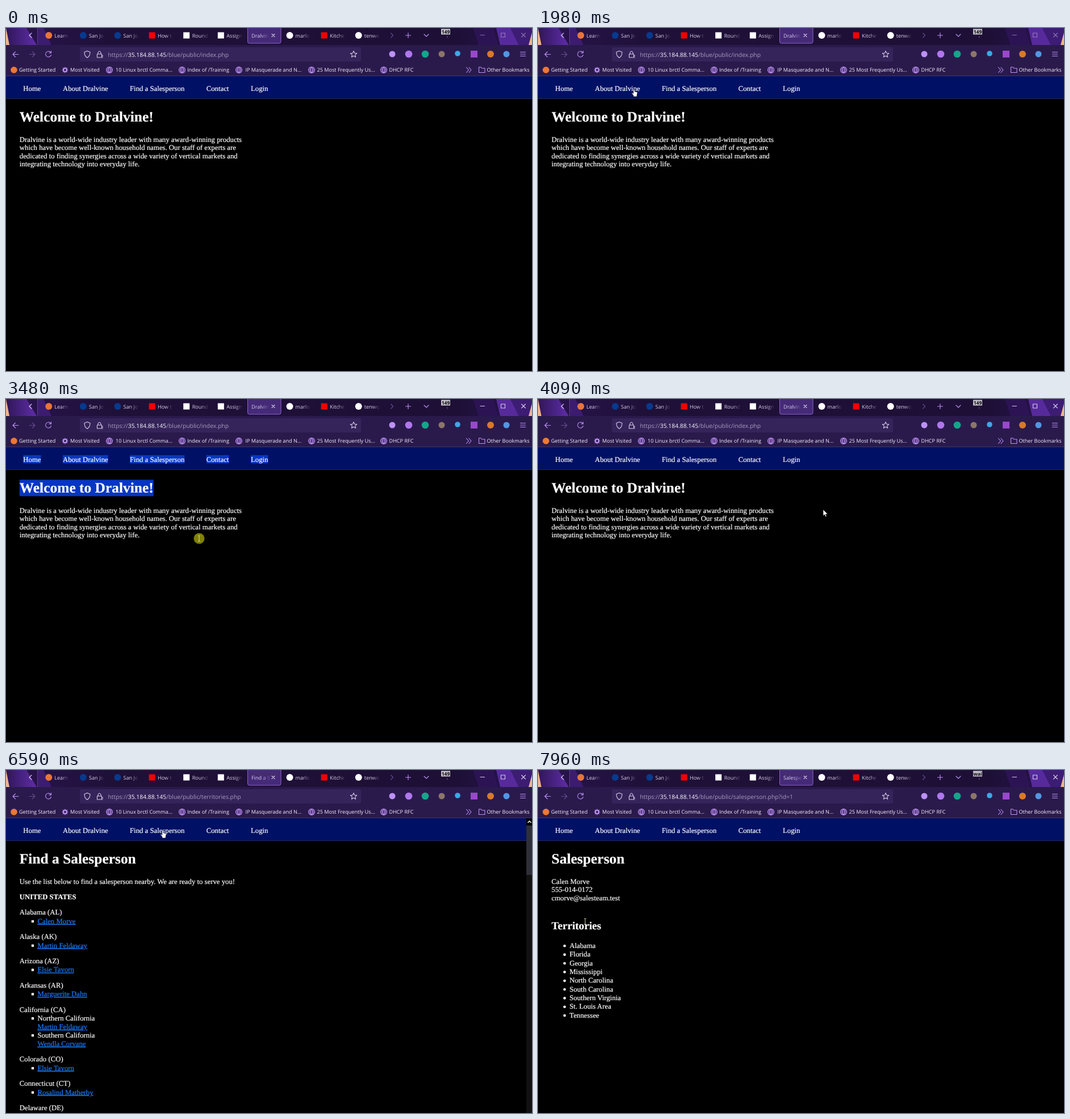
These frames come from a looping animation (926x605 px, 8000 ms). An HTML page:

```html
<!DOCTYPE html>
<html lang="en">
<head>
<meta charset="utf-8">
<title>Browser session</title>
<style>
  html, body { margin: 0; width: 100%; height: 100%; overflow: hidden; background: #000; }
  svg { display: block; width: 926px; height: 605px; }
  text { white-space: pre; text-rendering: geometricPrecision; }
  .ui { font: 9.1px "Open Sans", "Noto Sans", sans-serif; fill: #f4f0fb; }
  .url { font-size: 10.35px; fill: #a69bbd; }
  .url tspan { fill: #fbf9ff; }
  .page { font: 12.75px "Liberation Serif", "Times New Roman", serif; fill: #fff; }
  .page text { stroke: #fff; stroke-width: .2; }
  .page .h1 { font-size: 25.45px; font-weight: bold; }
  .page .h2 { font-size: 19.1px; font-weight: bold; }
  .bold { font-weight: bold; }
  .page .link { fill: #1a7cff; stroke: #1a7cff; text-decoration: underline; }
  .line { fill: none; stroke: #bd91f5; stroke-width: 1.1; stroke-linecap: round; stroke-linejoin: round; }
  .dim { stroke: #654b8c; }
  .pale { stroke: #d8cdea; }
</style>
</head>
<body>
<svg id="stage" viewBox="0 0 926 605">
  <defs>
    <linearGradient id="fade">
      <stop offset=".55" stop-color="#d6cde6"/>
      <stop offset="1" stop-color="#d6cde6" stop-opacity=".1"/>
    </linearGradient>
    <linearGradient id="strip">
      <stop stop-color="#2a1450"/><stop offset=".2" stop-color="#1f1038"/>
      <stop offset=".85" stop-color="#1d0f35"/><stop offset="1" stop-color="#2b1454"/>
    </linearGradient>
    <linearGradient id="violet">
      <stop stop-color="#2f1659"/><stop offset="1" stop-color="#5f2da8"/>
    </linearGradient>
  </defs>
  <g id="chrome"></g>
  <g id="selection"></g>
  <g id="nav" class="page"></g>
  <g id="pages" class="page"></g>
  <g id="cursor">
    <circle id="press" r="9.5" fill="#ffff00" fill-opacity=".5"/>
    <path id="arrow" d="M0 0V11.2L2.6 8.8 4.3 12.7 6.1 11.9 4.4 8.1H8Z" fill="#fff" stroke="#000" stroke-width=".6"/>
    <path id="hand" d="M-1.2 1Q0-.7 1.2 1V5L5 5.8Q6.3 6.2 6 8L5.2 11V14H-1V12L-4 8.2Q-3.4 6.4-1.2 8.5Z" fill="#fff" stroke="#000" stroke-width=".6"/>
    <path id="beam" d="M-2-5H-.6L0-4.4 .6-5H2M0-4.4V4.4M-2 5H-.6L0 4.4 .6 5H2" fill="none" stroke="#e4e4d4" stroke-width=".9"/>
  </g>
</svg>
<script>
const LOOP = 8000, STEP = 70;
const $ = id => document.getElementById(id);
const text = (x, y, s, cls = '', extra = '') => `<text x="${x}" y="${y}" class="${cls}" ${extra}>${s}</text>`;
const rect = (x, y, w, h, fill, extra = '') => `<rect x="${x}" y="${y}" width="${w}" height="${h}" fill="${fill}" ${extra}/>`;
const dot = (x, y, r, fill) => `<circle cx="${x}" cy="${y}" r="${r}" fill="${fill}"/>`;
const shape = (d, fill) => `<path d="${d}" fill="${fill}"/>`;
const line = (d, cls = '') => `<path class="line ${cls}" d="${d}"/>`;
const square = (x, y, size, fill) => rect(x - size / 2, y - size / 2, size, size, fill);

const globe = x => line(`M${x - 5.5} 74a5.5 5.5 0 1 0 11 0a5.5 5.5 0 1 0-11 0h11
  M${x} 68.5q-5 5.5 0 11q5-5.5 0-11M${x - 4.5} 71h9M${x - 4.5} 77h9`);

function gear(x, y) {
  let teeth = '';
  for (let i = 0; i < 8; i++) {
    const a = i * Math.PI / 4, c = Math.cos(a), s = Math.sin(a);
    teeth += `M${x + 3.5 * c} ${y + 3.5 * s}L${x + 5 * c} ${y + 5 * s}`;
  }
  return line(teeth) + `<circle cx="${x}" cy="${y}" r="3" fill="none" stroke="#bd91f5" stroke-width="2.2"/>`;
}

function star(x, y) {
  const points = Array.from({ length: 10 }, (_, i) => {
    const r = i % 2 ? 2.8 : 6, a = (i / 5 - .5) * Math.PI;
    return `${x + r * Math.cos(a)} ${y + r * Math.sin(a)}`;
  });
  return line(`M${points.join('L')}Z`, 'pale');
}

function tabStrip() {
  const tabs = [
    ['Learn', dot, '#e8743b'], ['San Jo', dot, '#063a8e'], ['San Jo', dot, '#063a8e'],
    ['How t', square, '#f40000'], ['Round', square, '#fff'], ['Assign', square, '#fff'], null,
    ['marlo', dot, '#fff'], ['Kitche', square, '#f40000'], ['tenwo', dot, '#fff']
  ];
  const items = tabs.map((tab, i) => {
    if (!tab) return '';
    const [label, icon, color] = tab, x = 75.3 + i * 60.6;
    return icon(x, 13, icon === dot ? 6 : 11, color) + text(x + 10, 16.5, label, '', 'style="fill:url(#fade)"');
  });
  return rect(0, 0, 926, 30, 'url(#strip)')
    + shape('M0 0H36L54 30H6Z', 'url(#violet)') + shape('M0 0L6 30H0Z', '#f0b48c')
    + shape('M56 0H66L80 30H56Z', '#3c1c70') + rect(55, 0, 1, 30, '#5a3a8c')
    + shape('M822 0H858L866 30H832Z', '#2c1454') + shape('M863 0H888L903 30H870Z', '#572a9c')
    + shape('M888 0H926V30H903Z', '#3d1c74') + shape('M926 8V30H920Z', '#f0b48c')
    + items.join('')
    + rect(425.5, -3, 58.5, 30, '#452a78', 'rx="3" stroke="#8d63ca"')
    + text(432, 16.5, '', '', 'id="title" style="fill:url(#fade)"')
    + line('M468 10.5l5 5m0-5l-5 5', 'pale')
    + line('M45 9l-4 4 4 4', 'pale') + line('M677.5 9l4 4-4 4', 'dim')
    + line('M703.5 13h9m-4.5-4.5v9M736 11l4 4 4-4')
    + `<g id="controls">${line('M835 12.5h7.5M871.5 9h7v7h-7zM907.5 9l7 7m0-7l-7 7', 'pale')}</g>`
    + rect(766, 1.5, 16, 10, '#c4c1c9')
    + text(774, 9.6, '', '', 'id="badge" text-anchor="middle" style="font-weight:bold;font-size:8.6px;fill:#0b0810"')
    + line('M776 15h1v2', 'dim');
}

function toolbar() {
  return rect(0, 30, 926, 55, '#2a1a4c') + rect(130, 34, 495, 25, '#35245a', 'rx="3"')
    + line('M22 46.5H12m4.5-4.5l-4.5 4.5 4.5 4.5M79 43.5a5 5 0 1 0 .5 4M79.5 40.5v3.5h-3.5')
    + line('M41 46.5h10m-4.5-4.5l4.5 4.5-4.5 4.5', 'dim')
    + line('M143 40.5l5 2q0 7-5 10q-5-3-5-10z', 'pale')
    + line('M160.5 46h8v6h-8zM162 46v-2.5q2.5-5 5 0v2.5M170 48v2.5m0 1.8v.1', 'pale')
    + text(179.5, 51, '', 'url', 'id="address"') + star(612, 46.5)
    + dot(680, 46, 5.5, '#bd91f5') + dot(709, 46, 6.3, '#b076ee') + dot(738, 46, 6.3, '#14a68a')
    + dot(767, 46, 5.5, '#8c7668') + dot(795, 45, 4.8, '#3ba9e6') + square(824, 46, 12, '#9a48cc')
    + dot(853, 46, 6, '#d9792c') + dot(881, 46, 5.5, '#5297e4')
    + line('M905.5 42.5h9m-9 3.5h9m-9 3.5h9');
}

function bookmarks() {
  const labels = [[23, 'Getting Started'], [113, 'Most Visited'], [193, '10 Linux brctl Comma...'],
    [319, 'Index of /Training'], [421.5, 'IP Masquerade and N...'], [547.5, '25 Most Frequently Us...'],
    [674.5, 'DHCP RFC'], [846.5, 'Other Bookmarks']];
  return dot(14, 74, 5.8, '#ed7836') + gear(104, 74) + [182, 310, 410, 538, 665].map(globe).join('')
    + line('M810.5 69.5l4 4.5-4 4.5m4.5-9l4 4.5-4 4.5M832.5 69h3.5l1.5 2h5.5v7.5h-10.5z')
    + labels.map(([x, s]) => text(x, 77.3, s)).join('');
}

$('chrome').innerHTML = `<g class="ui">${tabStrip()}${toolbar()}${bookmarks()}</g>`
  + rect(0, 84, 926, 1, '#40356e') + rect(0, 85, 926, 39, '#001064') + rect(0, 124, 926, 1, '#1c2a5e');

const navItems = [[30.3, 'Home'], [100, 'About Dralvine'], [218, 'Find a Salesperson'], [352.7, 'Contact'], [431, 'Login']];
$('nav').innerHTML = navItems.map(([x, s]) => text(x, 110.8, s)).join('');

const heading = s => text(23.8, 165.4, s, 'h1');
const lines = (x, y, pitch, rows) => rows.map((s, i) => text(x, y + i * pitch, s)).join('');

function home() {
  return heading('Welcome to Dralvine!') + lines(23.8, 200.5, 14.65, [
    'Dralvine is a world-wide industry leader with many award-winning products',
    'which have become well-known household names. Our staff of experts are',
    'dedicated to finding synergies across a wide variety of vertical markets and',
    'integrating technology into everyday life.']);
}

function territories() {
  const states = [
    ['Alabama (AL)', 'Calen Morve'], ['Alaska (AK)', 'Martin Feldaway'], ['Arizona (AZ)', 'Elsie Tavorn'],
    ['Arkansas (AR)', 'Marguerite Dahn'],
    ['California (CA)', ['Northern California', 'Martin Feldaway'], ['Southern California', 'Wendla Corvane']],
    ['Colorado (CO)', 'Elsie Tavorn'], ['Connecticut (CT)', 'Rosalind Matherby'], ['Delaware (DE)']
  ];
  let y = 255.3, out = '';
  for (const [state, ...agents] of states) {
    out += text(23.8, y, state);
    y += 15.4;
    for (const agent of agents) {
      const [region, name] = Array.isArray(agent) ? agent : [null, agent];
      out += square(47, y - 3.7, 4.2, '#fff');
      if (region) { out += text(55.5, y, region); y += 15; }
      out += text(55.5, y, name, 'link');
      y += 15;
    }
    y += 12.4;
  }
  return heading('Find a Salesperson')
    + text(23.8, 200.5, 'Use the list below to find a salesperson nearby. We are ready to serve you!')
    + text(23.8, 228, 'UNITED STATES', 'bold') + out
    + rect(916, 85, 10, 520, '#111') + rect(916, 85, 10, 13, '#000') + rect(916, 98, 10, 87, '#2e2f38')
    + '<path d="M918.5 93l3-3 3 3" fill="none" stroke="#fff" stroke-width="1.5"/>';
}

function salesperson() {
  const areas = ['Alabama', 'Florida', 'Georgia', 'Mississippi', 'North Carolina', 'South Carolina',
    'Southern Virginia', 'St. Louis Area', 'Tennessee'];
  return heading('Salesperson')
    + lines(23.8, 200.5, 14.65, ['Calen Morve', '555-014-0172', 'cmorve@salesteam.test'])
    + text(23.8, 281, 'Territories', 'h2') + lines(55.5, 314, 15.35, areas)
    + areas.map((_, i) => dot(46.8, 310.3 + i * 15.35, 2.3, '#fff')).join('');
}

const pages = [
  { from: 0, ready: 0, title: 'Dralvin', path: 'index.php', draw: home },
  { from: 5820, ready: 6320, title: 'Find a S', path: 'territories.php', draw: territories },
  { from: 7700, ready: LOOP, title: 'Salespe', path: 'salesperson.php?id=1', draw: salesperson }
];
$('pages').innerHTML = pages.map(p => `<g>${p.draw()}</g>`).join('');

// Selection boxes follow the measured text.
$('selection').innerHTML = [...document.querySelectorAll('#nav text, #pages g:first-child .h1')].map(el => {
  const big = el.classList.contains('h1'), y = +el.getAttribute('y');
  return rect(el.getAttribute('x'), y - (big ? 23 : 11.8), el.getComputedTextLength(), big ? 29 : 14.5, '#0636c2');
}).join('');

// Pointer path: time, x, y, shape until the next stop.
const stops = [
  [130, 677, 497, 'arrow'], [480, 420, 270, 'arrow'], [690, 177, 66, 'arrow'], [890, 318, 107, 'arrow'],
  [960, 316, 107, 'hand'], [1160, 299, 107, 'hand'], [1360, 297, 107, 'hand'], [1710, 158, 107, 'hand'],
  [1910, 158, 107, 'hand'], [1980, 169, 107, 'hand'], [2730, 360, 107, 'hand'], [2810, 355, 108, 'hand'],
  [3010, 96, 117, 'arrow'], [3340, 96, 117, 'beam'], [3410, 240, 205, 'beam'], [3480, 340, 246, 'beam'],
  [3620, 400, 274, 'arrow'], [3830, 553, 230, 'arrow'], [4090, 502, 195, 'arrow'], [4160, 444, 163, 'arrow'],
  [4230, 430, 150, 'arrow'], [4440, 368, 106, 'hand'], [4710, 374, 107, 'hand'], [5000, 475, 110, 'hand'],
  [5410, 281, 106, 'hand'], [5480, 276, 106, 'hand'], [6590, 276, 106, 'hand'], [6660, 258, 78, 'arrow'],
  [6800, 205, 45, 'arrow'], [7150, 90, 245, 'arrow'], [7290, 83, 267, 'hand'], [7700, 83, 267, 'beam'],
  [LOOP, 83, 267, 'beam']
];
const presses = [[3010, 3620], [5610, 5760], [7490, 7630]];
const within = (t, [a, b]) => t >= a && t < b;
const show = (el, on) => { el.style.display = on ? '' : 'none'; };

function drawPointer(t) {
  const next = stops.findIndex(s => s[0] > t);
  show($('cursor'), next > 0);
  if (next < 1) return;
  const [t0, x0, y0, kind] = stops[next - 1], [t1, x1, y1] = stops[next];
  const k = Math.floor((t - t0) / STEP) * STEP / (t1 - t0);
  $('cursor').setAttribute('transform', `translate(${x0 + (x1 - x0) * k} ${y0 + (y1 - y0) * k})`);
  for (const name of ['arrow', 'hand', 'beam']) show($(name), name === kind);
  show($('press'), presses.some(p => within(t, p)));
}

let current;
function drawPage(t) {
  const page = pages.findLast(p => t >= p.from);
  $('badge').textContent = t < page.ready ? 'wai' : '149';
  if (page === current) return;
  current = page;
  $('title').textContent = page.title;
  $('address').innerHTML = `https://<tspan>35.184.88.145</tspan>/blue/public/${page.path}`;
  pages.forEach((p, i) => show($('pages').children[i], p === page));
}

function frame() {
  const t = performance.now() % LOOP;
  drawPage(t);
  drawPointer(t);
  show($('selection'), within(t, [3410, 3700]));
  $('controls').style.opacity = t < 3010 ? .5 : 1;
  requestAnimationFrame(frame);
}
frame();
</script>
</body>
</html>
```
